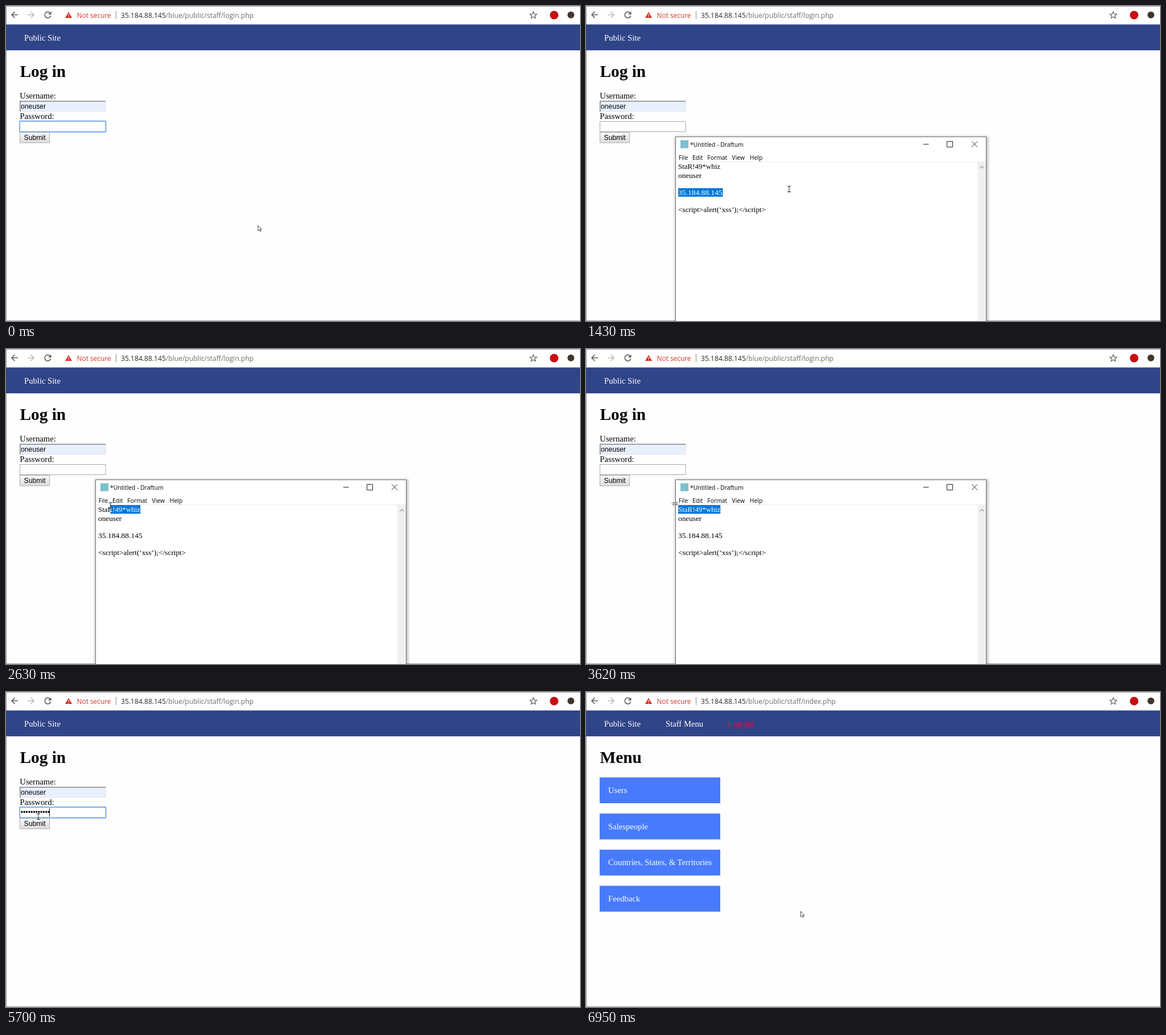
Recreate the animation shown at these times as an HTML page. Size 1009x555 px, loop 8000 ms.

```html
<!DOCTYPE html>
<html lang="en">
<head>
<meta charset="utf-8">
<title>Staff log in</title>
<style>
  html, body { margin: 0; width: 100%; height: 100%; overflow: hidden; background: #fefefe; }
  svg { display: block; width: 1009px; height: 555px; }
  text { white-space: pre; }
  .serif { font: 14.67px "Liberation Serif", "Times New Roman", serif; }
  .title { font-size: 29.33px; font-weight: bold; }
  .sans { font: 12.22px "Liberation Sans", Arial, sans-serif; }
  .ui { font: 12.1px "Open Sans", "Noto Sans", sans-serif; }
  .warn { font-size: 11.9px; }
  .small { font-size: 10.4px; }
  .note { font-size: 13.25px; }
  .secret { font-size: 12.95px; }
  .host { font-size: 13.5px; }
  .line { fill: none; stroke: #5a5d61; stroke-width: 1.6; }
  .thin { fill: none; stroke: #222; }
  .caret { width: 1px; height: 15px; }
  .button { x: 24.5px; y: 222.5px; width: 52px; height: 18.5px; stroke: #adadad; }
  .button.hot { fill: none; stroke: #8a8a8a; }
  .button.down { fill: #d8d8d8; stroke: #8a8a8a; }
  .picked rect { fill: #0078d7; }
  .picked text { fill: #fff; }
</style>
</head>
<body>
<svg viewBox="0 0 1009 555">
  <defs>
    <linearGradient id="face" x2="0" y2="1">
      <stop stop-color="#f8f8f8"/>
      <stop offset="1" stop-color="#dcdcdc"/>
    </linearGradient>
    <filter id="shadow" x="-5%" y="-5%" width="110%" height="110%">
      <feGaussianBlur stdDeviation="2"/>
    </filter>
    <clipPath id="dragClip"><rect id="drag" y="275" width="0" height="15.5"/></clipPath>
  </defs>

  <rect width="1009" height="555" fill="#fefefe"/>
  <rect width="1009" height="33" fill="#fff"/>
  <path d="M0 .5H1009M.5 0V555M0 554.5H1009" stroke="#9b9b9b"/>

  <!-- Address bar -->
  <path id="back" class="line" d="M21 15.5H10m5.5 -5.5l-5.5 5.5l5.5 5.5"/>
  <path class="line" d="M38 15.5H49m-5.5 -5.5l5.5 5.5l-5.5 5.5" style="stroke:#b9bbbe"/>
  <g data-show="start load done end">
    <path class="line" d="M77.3 12A5.3 5.3 0 1 0 78.6 17"/>
    <path d="M79.5 9.5v5.5h-5.5Z" fill="#5a5d61"/>
  </g>
  <path class="line" data-show="load done" d="M68.5 10.5l10 10m0 -10l-10 10"/>
  <path d="M110 10.5l6 10.5h-12Z" fill="#d62d20"/>
  <path d="M110 14v3.5m0 1v1.3" stroke="#fff" stroke-width="1.2"/>
  <path d="M193.5 9v14" stroke="#8b8b8b"/>
  <g class="ui">
    <text class="warn" x="124.5" y="20.5" fill="#d5382c">Not secure</text>
    <text x="202" y="20.5" fill="#6a6d70"><tspan fill="#26282a">35.184.88.145</tspan>/blue/public/staff/<tspan id="page">login.php</tspan></text>
  </g>
  <polygon id="star" class="line" style="stroke-width:1.2"/>
  <circle cx="963.5" cy="16" r="7.5" fill="#c70d12"/>
  <circle id="badge" cx="993" cy="15.7" r="6" fill="#40362a"/>

  <!-- Site header -->
  <rect y="32.5" width="1009" height="45.6" fill="#304488"/>
  <text class="serif" x="32" y="61.3" fill="#fff">Public Site</text>

  <g data-show="start arrive">
    <g class="serif">
      <text class="title" x="24.5" y="125">Log in</text>
      <text x="24.3" y="163">Username:</text>
      <text x="24.3" y="199">Password:</text>
    </g>
    <rect x="24" y="167" width="151.5" height="19" fill="#e8f0fe"/>
    <path d="M24.5 185.5h150.5v-18" fill="none" stroke="#e3e3e3"/>
    <path d="M24.8 186v-18.2h150.5" fill="none" stroke="#858585" stroke-width="1.6"/>
    <text class="sans" x="26" y="181">oneuser</text>

    <rect x="24.5" y="203.500" width="150.5" height="18" fill="#fff" stroke="#a9a9a9"/>
    <rect data-show="start blur focus press" x="24" y="202.8" width="151.5" height="19" rx="1" fill="#fff" stroke="#4d90e8" stroke-width="1.4"/>
    <text class="sans" id="dots" data-show="paste end" x="25.8" y="216.3"></text>
    <rect class="caret" data-show="focus paste" x="26" y="205"/>
    <rect class="caret" data-show="paste aim" x="76" y="205"/>

    <rect class="button" fill="url(#face)"/>
    <rect class="button hot" data-show="hover unhover aim leave"/>
    <rect class="button down" data-show="press load"/>
    <text class="sans" x="31.5" y="236">Submit</text>
  </g>

  <g class="serif" data-show="arrive end">
    <text x="140" y="61.3" fill="#fff">Staff Menu</text>
    <text x="249.5" y="61.3" fill="#e9132c">Log out</text>
    <text class="title" x="24.5" y="125">Menu</text>
    <g id="links" fill="#fff"></g>
  </g>

  <!-- Text editor -->
  <g data-show="open close">
    <rect x="156" y="229.5" width="551" height="340" fill="#000" opacity=".25" filter="url(#shadow)"/>
    <rect x="157.5" y="230.5" width="546" height="340" fill="#fff" stroke="#707070"/>
    <rect x="166" y="236.5" width="14" height="14" fill="#7fbfcd"/>
    <path class="thin" d="M593 243.5h9.5M634.5 238.5h10v10h-10ZM678 238.500l10 10m0 -10l-10 10"/>
    <g class="ui small">
      <text x="183" y="248">*Untitled - Draftum</text>
      <text x="162.8" y="270.6">File</text>
      <text x="187" y="270.6">Edit</text>
      <text x="213.3" y="270.6">Format</text>
      <text x="256.5" y="270.6">View</text>
      <text x="287.8" y="270.6">Help</text>
    </g>
    <path d="M158 274.5h545" stroke="#ececec"/>
    <rect x="688" y="275" width="15" height="280" fill="#f0f0f0"/>
    <path d="M692.5 286l3.5 -3.5l3.5 3.5" fill="none" stroke="#a3a3a3" stroke-width="1.5"/>
    <g class="serif note">
      <text class="secret" x="162" y="287.3">StaR!49*whiz</text>
      <text x="162" y="302.7">oneuser</text>
      <text class="host" x="162" y="333">35.184.88.145</text>
      <text x="162" y="363.3">&lt;script&gt;alert(‘xss’);&lt;/script&gt;</text>
      <g class="picked" data-show="open deselect">
        <rect x="162" y="321" width="78.5" height="15"/>
        <text class="host" x="162" y="333">35.184.88.145</text>
      </g>
      <g class="picked" clip-path="url(#dragClip)">
        <rect x="162" y="275" width="74.5" height="15.5"/>
        <text class="secret" x="162" y="287.3">StaR!49*whiz</text>
      </g>
    </g>
    <rect class="caret" data-show="open settle" x="162" y="306"/>
    <rect class="caret" data-show="deselect place" x="240" y="321"/>
    <rect class="caret" data-show="place select" x="235.5" y="275"/>
  </g>

  <g id="pointer">
    <path id="arrow" d="M.5 .5v9.5l2.2 -1.8l1.5 3.1l1.5 -.7l-1.4 -3.1h2.7Z" fill="#fff" stroke="#333" stroke-width=".9"/>
    <path id="beam" d="M-3 -5h6m-3 0v10m-3 0h6" fill="none" stroke="#222"/>
    <path id="resize" d="M-5.5 0l3 -3v2h5v-2l3 3l-3 3v-2h-5v2Z" fill="#fff" stroke="#333" stroke-width=".8"/>
  </g>
</svg>
<script>
const FRAME = 135;
const cues = {
  start: 0, blur: 690, open: 840, settle: 1140, deselect: 1580, place: 2110, select: 2260,
  hover: 4320, unhover: 4450, close: 4590, focus: 4740, paste: 5150, aim: 5840,
  press: 6100, load: 6250, leave: 6530, arrive: 6790, done: 6950, end: 8000
};
const $ = id => document.getElementById(id);

// Each move glides from where the last one ended
const moves = [
  { shape: 'arrow', from: 0, x: 442.5, y: 386 },
  { shape: 'arrow', from: 120, x: 455, y: 383.5 },
  { shape: 'arrow', from: 330, to: 690, x: 494, y: 383 },
  { shape: 'beam', from: 1000, x: 451, y: 312.5 },
  { shape: 'beam', from: 1140, to: 1430, x: 357, y: 322.5 },
  { shape: 'beam', from: 1720, to: 2110, x: 297, y: 291 },
  { shape: 'beam', from: 2260, to: 2780, x: 162, y: 273 },
  { shape: 'resize', from: 2930, to: 3050, x: 156.5, y: 272.5 },
  { shape: 'arrow', from: 4040, to: 4170, x: 79, y: 243 },
  { shape: 'arrow', from: 4320, x: 74, y: 231 },
  { shape: 'beam', from: 4450, to: 4590, x: 73, y: 214 },
  { shape: 'beam', from: 5700, x: 57, y: 219.5 },
  { shape: 'arrow', from: 5840, to: 5970, x: 52, y: 229 },
  { shape: 'arrow', from: 6530, to: 6650, x: 377, y: 386 }
];

const easeOut = p => 1 - (1 - p) ** 2;

function pointerAt(t) {
  const i = moves.findLastIndex(move => move.from <= t);
  const { shape, from, to = from, x, y } = moves[i];
  const last = moves[Math.max(i - 1, 0)];
  const steps = Math.round((to - from) / FRAME) + 1;
  const step = to > from ? Math.floor((t - from) / (to - from) * (steps - 1)) + 1 : 1;
  const p = easeOut(Math.min(step / steps, 1));
  return { shape, x: last.x + (x - last.x) * p, y: last.y + (y - last.y) * p };
}

function buildStar() {
  return Array.from({ length: 10 }, (_, i) => {
    const radius = i % 2 ? 2.8 : 6.4;
    const angle = (i / 5 - .5) * Math.PI;
    return [927 + radius * Math.cos(angle), 16.3 + radius * Math.sin(angle)];
  }).join(' ');
}

$('star').setAttribute('points', buildStar());
$('dots').textContent = '•'.repeat('StaR!49*whiz'.length);
$('links').innerHTML = ['Users', 'Salespeople', 'Countries, States, &amp; Territories', 'Feedback']
  .map((label, i) => `<g transform="translate(24 ${150.5 + i * 63.65})">
    <rect width="212" height="45.5" fill="#477bfc"/><text x="15" y="27.5">${label}</text></g>`)
  .join('');

const timed = [...document.querySelectorAll('[data-show]')].map(el => ({
  el, times: el.dataset.show.split(' ').map(cue => cues[cue])
}));

function render(t) {
  // An odd number of passed cues means visible
  for (const { el, times } of timed) {
    el.style.display = times.filter(time => time <= t).length % 2 ? '' : 'none';
  }

  const { shape, x, y } = pointerAt(t);
  $('pointer').setAttribute('transform', `translate(${x} ${y})`);
  for (const name of ['arrow', 'beam', 'resize']) {
    $(name).style.display = name === shape ? '' : 'none';
  }

  // The selection follows the pointer leftwards from the line's end
  const lineEnd = 236.5;
  const left = t < cues.select ? lineEnd : Math.min(lineEnd, Math.max(162, x));
  $('drag').setAttribute('x', left);
  $('drag').setAttribute('width', lineEnd - left);

  $('page').textContent = t < cues.arrive ? 'login.php' : 'index.php';
  $('badge').style.opacity = t >= cues.arrive && t < cues.done ? .4 : 1;
}

const start = performance.now();
function tick() {
  render((performance.now() - start) % cues.end);
  requestAnimationFrame(tick);
}
tick();
</script>
</body>
</html>
```
